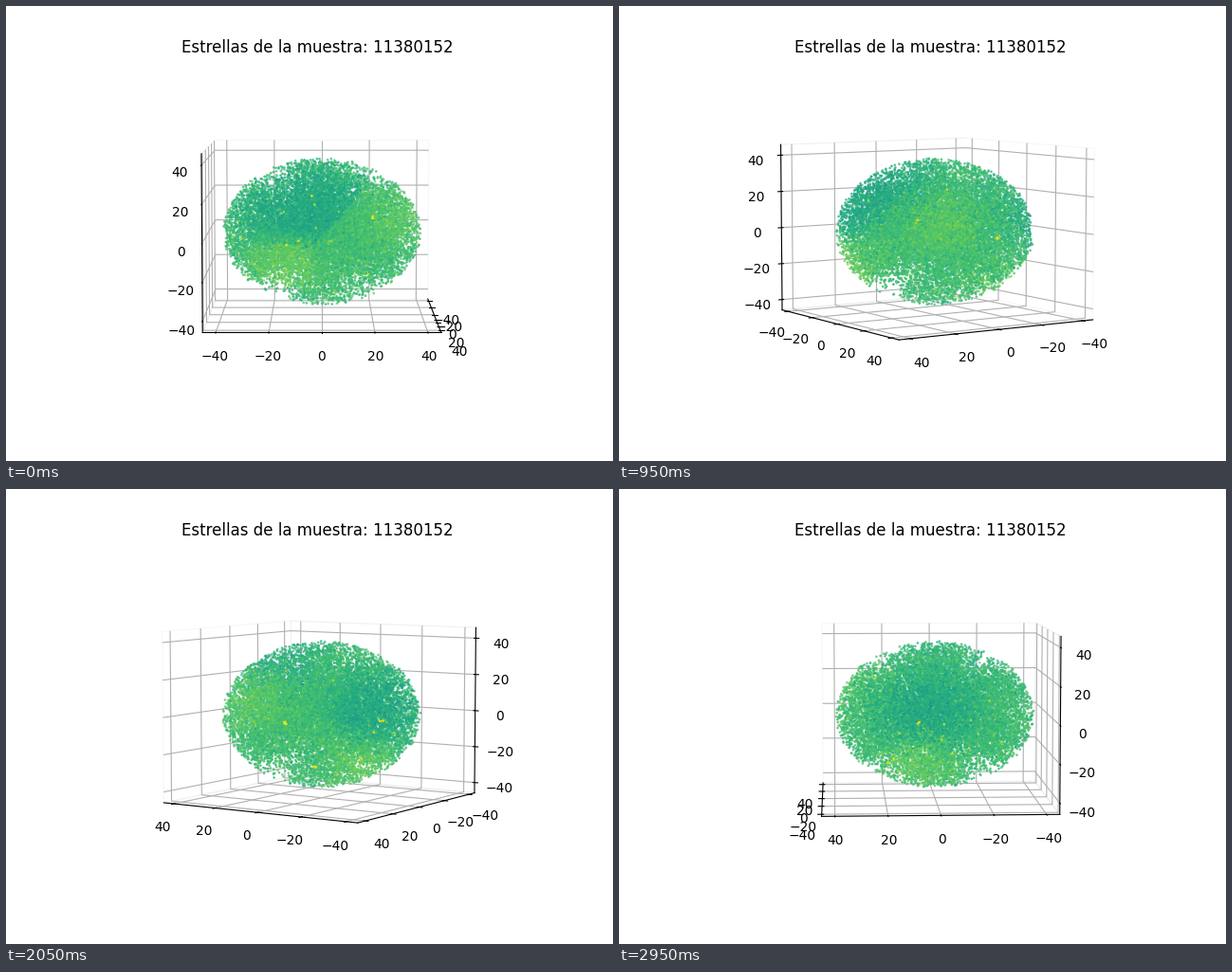
Recreate the animation shown at these times as a matplotlib script. Size 640x480 px, loop 3 s.

```python
import numpy as np
import matplotlib.pyplot as plt
from matplotlib.animation import FuncAnimation

FRAMES, STEP = 60, 3
RADIUS = 39.5
COUNT = 19000
rng = np.random.default_rng(7)


def unit(lon, lat):
    lon, lat = np.radians([lon, lat])
    return np.array([np.cos(lat) * np.cos(lon), np.cos(lat) * np.sin(lon), np.sin(lat)])


def spot(dirs, lon, lat, width):
    """Flat-topped spot on the sphere, 1 at its centre; width in degrees."""
    angle = np.degrees(np.arccos(np.clip(dirs @ unit(lon, lat), -1, 1)))
    return np.exp(-(angle / width) ** 4)


def density(dirs):
    """Share of stars kept: sparse rings around both polar stalks."""
    x, y, z = dirs.T
    lon, lat = np.arctan2(y, x), np.degrees(np.arcsin(z))
    ring = np.exp(-((np.abs(lat) - 56) / 14) ** 6)
    south = 1 - np.exp(2 * (np.cos(lon - np.radians(165)) - 1))
    north = np.sin(lon) ** 4
    return 1 - 0.93 * ring * np.where(z < 0, south, north)


def tone(dirs):
    """Mean colour value for each direction."""
    x, y, z = dirs.T
    seam = (y < 0.61 * z) & (z > -0.1)
    teal = seam * spot(dirs, -20, 38, 52) + spot(dirs, 172, 10, 42)
    lime = spot(dirs, -32, -26, 28) + spot(dirs, 165, -42, 26) + 0.7 * spot(dirs, 65, 14, 28)
    return 0.69 - 0.085 * teal + 0.075 * lime


def make_stars():
    dirs = rng.normal(size=(COUNT, 3))
    dirs /= np.linalg.norm(dirs, axis=1)[:, None]
    dirs = dirs[rng.random(COUNT) < density(dirs)]
    n = len(dirs)
    value = tone(dirs) + rng.normal(0, 0.032, n)
    bright = rng.random(n) < 0.006
    value[bright] = rng.uniform(0.82, 0.97, bright.sum())
    pos = dirs * RADIUS * rng.random((n, 1)) ** 0.4
    centres = [(20, 20, 10), (-6, 35, 0), (-9, 19, -25), (-32, 8, 0)]
    knots = np.repeat(centres, 8, axis=0) + rng.normal(0, 0.35, (8 * len(centres), 3))
    return np.vstack([pos, knots]), np.append(value, np.full(len(knots), 0.95))


stars, shade = make_stars()
fig = plt.figure(figsize=(6.4, 4.8), dpi=100)
ax = fig.add_subplot(projection="3d")
ax.scatter(*stars.T, c=shade, s=1, cmap="viridis", vmin=0, vmax=1)
ax.set(xlim=(-45, 45), ylim=(-45, 45), zlim=(-45.8, 45.8))
ax.set_title("Estrellas de la muestra: 11380152")
for axis in (ax.xaxis, ax.yaxis, ax.zaxis):
    axis.pane.fill = False
    axis.set_major_locator(plt.MultipleLocator(20))


def update(i):
    ax.view_init(elev=6, azim=STEP * i)
    return ()


anim = FuncAnimation(fig, update, frames=FRAMES, interval=50, repeat=True, repeat_delay=0)
plt.show()
```
